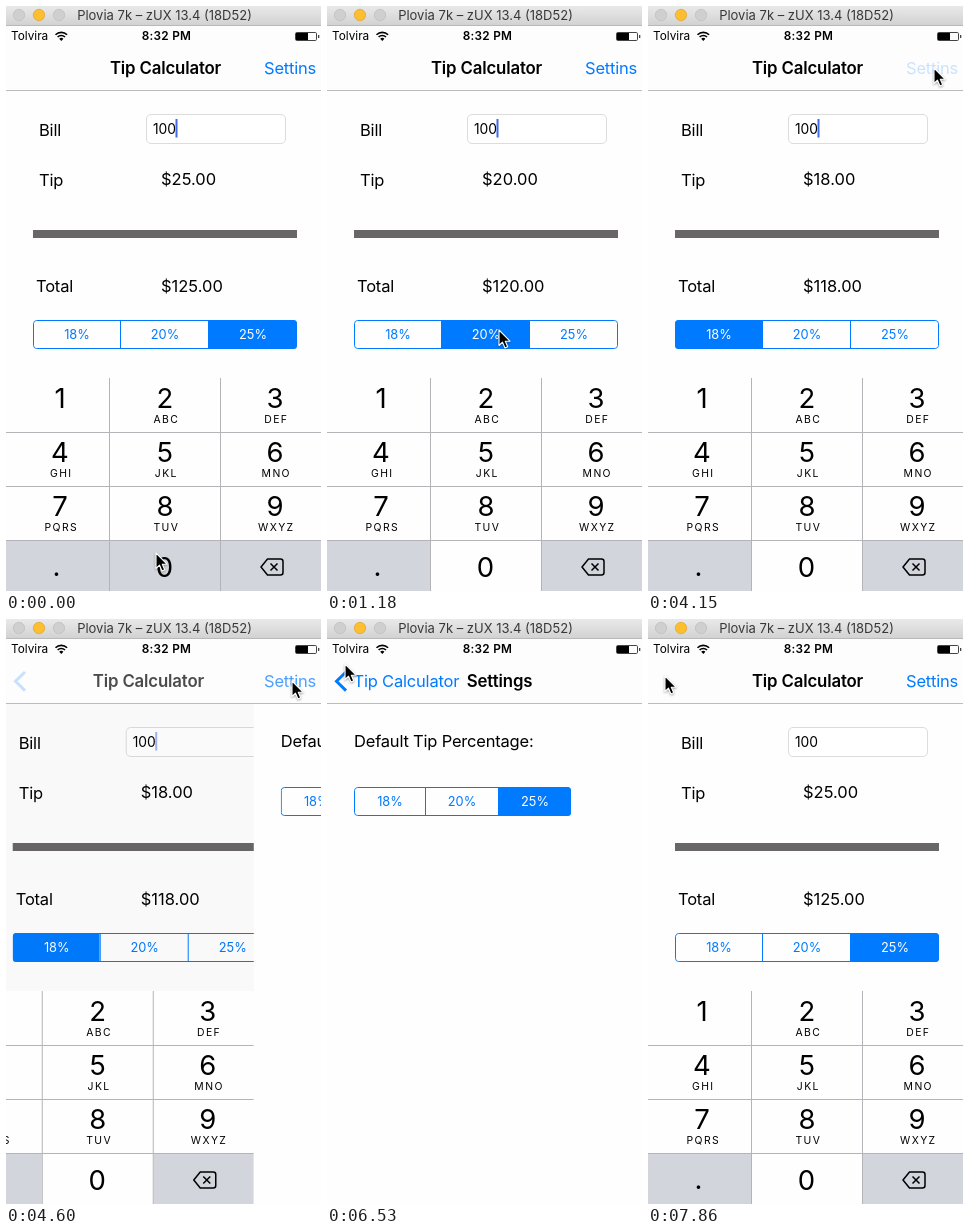
Recreate the animation shown at these times as an HTML page. Size 315 px wide and 585 px high, loop 8000 ms.

```html
<!DOCTYPE html>
<html lang="en">
<head>
<meta charset="utf-8">
<title>Tip Calculator</title>
<style>
  html, body { margin: 0; width: 100%; height: 100%; overflow: hidden; background: #fefefe; }
  svg { display: block; width: 100vw; height: 100vh; }
  text { font-family: Inter, Roboto, "Liberation Sans", sans-serif; font-size: 16.5px; letter-spacing: -.2px; fill: #000; white-space: pre; }
  .mid { text-anchor: middle; }
  .bold { font-weight: 600; font-size: 16.8px; letter-spacing: -.15px; }
  .value { letter-spacing: 0; }
  .small { font-size: 11.8px; letter-spacing: 0; }
  .clock { font-weight: 600; letter-spacing: .25px; }
  .window { font-size: 13px; letter-spacing: 0; fill: #383838; }
  .link { fill: #007aff; }
  .input { font-size: 13.8px; letter-spacing: 0; }
  .cell { font-size: 12.8px; letter-spacing: 0; }
  .digit { font-size: 27.5px; letter-spacing: 0; }
  .letters { font-size: 10.4px; letter-spacing: 1.4px; }
</style>
</head>
<body>
<svg id="stage" viewBox="0 0 315 585">
  <defs>
    <linearGradient id="chrome" x2="0" y2="1">
      <stop offset="0" stop-color="#e9e9e9"/><stop offset="1" stop-color="#d1d1d1"/>
    </linearGradient>
  </defs>
</svg>
<script>
const LOOP = 8000;
const BLUE = '#007aff', PAPER = '#fefefe', KEY_GRAY = '#d2d5db', LINE = '#b4b4b8';
const RATES = [18, 20, 25];
const stage = document.getElementById('stage');

function el(tag, attrs, parent = stage) {
  const node = document.createElementNS('http://www.w3.org/2000/svg', tag);
  for (const key in attrs) node.setAttribute(key, attrs[key]);
  return parent.appendChild(node);
}
const group = (parent) => el('g', {}, parent);
const rect = (x, y, width, height, fill, parent, more) =>
  el('rect', { x, y, width, height, fill, ...more }, parent);
const stroke = (d, color, width, parent, more) =>
  el('path', { d, fill: 'none', stroke: color, 'stroke-width': width, ...more }, parent);
function label(str, x, y, cls, parent) {
  const node = el('text', { x, y, class: cls }, parent);
  node.textContent = str;
  return node;
}
const shift = (node, x, y = 0) => node.setAttribute('transform', `translate(${x} ${y})`);
const fade = (node, v) => node.setAttribute('opacity', v);

// Segmented control; returns a function that selects one cell
function segments(edges, y, centers, parent) {
  const id = 'clip' + y, x = edges[0], w = edges[3] - x;
  rect(x, y, w, 29, '#000', el('clipPath', { id }), { rx: 3.5 });
  const fills = el('g', { 'clip-path': `url(#${id})` }, parent);
  const cells = RATES.map((rate, i) => ({
    box: rect(edges[i], y, edges[i + 1] - edges[i], 29, PAPER, fills),
    text: label(rate + '%', centers[i], y + 19, 'cell mid', parent)
  }));
  rect(x + .5, y + .5, w - 1, 28, 'none', fills, { rx: 3, stroke: BLUE });
  stroke(`M${edges[1] + .5} ${y}v29M${edges[2] + .5} ${y}v29`, BLUE, 1, fills);
  return (pick) => cells.forEach(({ box, text }, i) => {
    box.setAttribute('fill', i === pick ? BLUE : PAPER);
    text.style.fill = i === pick ? '#fff' : BLUE;
  });
}

// Calculator screen
const home = group();
rect(0, 85, 315, 500, PAPER, home);
label('Bill', 33, 130, '', home);
rect(140.5, 108.5, 139, 29, '#fff', home, { rx: 4.5, stroke: '#dcdcdc' });
label('100', 147, 128, 'input', home);
const caret = rect(169.5, 113, 2, 18.5, '#4169ef', home);
label('Tip', 33, 179.5, '', home);
const tipText = label('', 155, 178.5, 'value', home);
rect(27, 224, 264, 8, '#696667', home);
label('Total', 30, 286, '', home);
const totalText = label('', 155, 286, 'value', home);
const pickRate = segments([27, 114, 202, 291], 314, [71, 159, 247], home);
const shade = rect(0, 85, 315, 500, '#000', home);

// Keypad
const pad = group();
rect(0, 372, 315, 213, PAPER, pad);
rect(0, 535, 103, 50, KEY_GRAY, pad);
rect(215, 535, 100, 50, KEY_GRAY, pad);
const zeroKey = rect(104, 535, 110, 50, PAPER, pad);
stroke('M0 426.5h315M0 480.5h315M0 534.5h315M103.5 372v213M214.5 372v213', LINE, 1, pad);
const columns = [54, 159, 269];
['', 'ABC', 'DEF', 'GHI', 'JKL', 'MNO', 'PQRS', 'TUV', 'WXYZ'].forEach((letters, i) => {
  const x = columns[i % 3], y = 402 + 54 * Math.floor(i / 3);
  label(i + 1, x, y, 'digit mid', pad);
  label(letters, x + 1.3, y + 15, 'letters mid', pad);
});
label('0', 158.5, 571, 'digit mid', pad);
label('.', 50.5, 570, 'digit mid', pad);
stroke('M261.5 553h13a2.5 2.5 0 0 1 2.5 2.5v11a2.5 2.5 0 0 1-2.5 2.5h-13l-6.5-8z', '#000', 1.5, pad, { 'stroke-linejoin': 'round' });
stroke('M264.5 557.5l7 7m0-7l-7 7', '#000', 1.5, pad);

// Settings screen
const settings = group();
rect(0, 85, 315, 500, PAPER, settings);
label('Default Tip Percentage:', 27, 128, '', settings);
const pickDefault = segments([27, 98, 171, 244], 168, [63, 135, 208], settings);

// Navigation bar
rect(0, 20, 315, 65, '#fdfdfd');
stroke('M0 84.5h315', '#bcbcbd', 1);
const homeTitle = label('Tip Calculator', 159.5, 68, 'bold mid');
const action = label('Settins', 258, 68, 'link');
const chevron = stroke('M19 53l-9.5 9.3l9.5 9.3', BLUE, 3);
const backLabel = label('Tip Calculator', 26.5, 68, 'link');
const setTitle = label('Settings', 172.5, 68, 'bold mid');

// Status bar
label('Tolvira', 5, 34, 'small');
stroke('M49.5 28.7a8.3 8.3 0 0 1 11.6 0M51.6 31a5.3 5.3 0 0 1 7.4 0', '#000', 1.6);
el('path', { d: 'M55.3 35l-2.1-2.2a3 3 0 0 1 4.2 0z' });
label('8:32 PM', 160.5, 34, 'small clock mid');
rect(289.5, 26.5, 21, 8, 'none', stage, { rx: 1.2, stroke: '#444' });
rect(290, 27, 12, 7, '#000');
rect(312, 29, 1.3, 3, '#444');

// Window bar
rect(0, 0, 315, 20, 'url(#chrome)');
stroke('M0 19.5h315', '#b9b9b9', 1);
[['#cfcfcf', '#bdbdbd'], ['#fdbe2f', '#e0a32c'], ['#cfcfcf', '#bdbdbd']].forEach(([fill, edge], i) =>
  el('circle', { cx: 13 + 20 * i, cy: 9, r: 5.7, fill, stroke: edge, 'stroke-width': .7 }));
label('Plovia 7k – zUX 13.4 (18D52)', 158.5, 14, 'window mid');

const cursor = group();
cursor.style.filter = 'drop-shadow(0 1px 1px rgba(0,0,0,.35))';
el('path', {
  d: 'M0 0V15.5L3.5 12.2L6 18L8.7 16.8L6.3 11.2H11z',
  stroke: '#fff', 'stroke-width': 1.1, 'stroke-linejoin': 'round'
}, cursor);

// The picture updates in bursts: [first, last, count]
const ticks = [0];
[[150, 1180, 8], [1330, 2220, 7], [2520, 2660, 2], [3110, 4150, 8], [4600, 5630, 8],
 [5780, 5780, 1], [6080, 7120, 8], [7260, 7860, 5]].forEach(([a, b, n]) => {
  for (let i = 0; i < n; i++) ticks.push(a + (n > 1 ? (b - a) * i / (n - 1) : 0));
});

const path = [
  [0, 150, 547], [150, 150, 547], [1000, 172, 324], [1190, 172, 324], [1900, 65, 320],
  [3000, 65, 320], [3900, 286, 62], [4650, 286, 62], [5190, 221, 168], [5600, 213, 175],
  [5930, 213, 175], [6530, 18, 45], [6830, 17, 57], [LOOP, 17, 57]
];
const rateSteps = [[0, 2], [1030, 1], [1920, 0], [6960, 2]];

const clamp = (v) => Math.min(1, Math.max(0, v));
const smooth = (v) => v * v * (3 - 2 * v);
const easeOut = (v) => 1 - (1 - clamp(v)) ** 3;
const lastAt = (list, t, key) => list.filter((item) => key(item) <= t).pop();

function cursorAt(t) {
  const i = path.findIndex((p) => p[0] > t);
  const [t0, x0, y0] = path[i - 1], [t1, x1, y1] = path[i];
  const k = smooth((t - t0) / (t1 - t0));
  return [x0 + (x1 - x0) * k, y0 + (y1 - y0) * k];
}

function caretAt(t) {
  const phase = ((t - 3110) % 1020 + 1020) % 1020;
  if (phase < 400 || phase > 960) return 1;
  return phase < 500 ? .5 : 0;
}

function draw(t) {
  const push = easeOut((t - 4560) / 520) - easeOut((t - 6970) / 480);
  const rest = 1 - push;
  const pick = lastAt(rateSteps, t, (s) => s[0])[1];
  const tip = RATES[pick];

  pickRate(pick);
  tipText.textContent = '$' + tip.toFixed(2);
  totalText.textContent = '$' + (100 + tip).toFixed(2);
  pickDefault(t < 5780 ? 1 : 2);
  zeroKey.setAttribute('fill', t < 150 ? KEY_GRAY : PAPER);
  fade(caret, caretAt(t));

  shift(home, -95 * push);
  fade(shade, .1 * push);
  shift(pad, -315 * push);
  shift(settings, 315 * rest);

  shift(homeTitle, -80 * push);
  fade(homeTitle, clamp(1 - 1.4 * push));
  fade(action, t >= 4140 && t < 4600 ? .2 : clamp(1 - 1.4 * push));
  shift(backLabel, 80 * rest);
  fade(backLabel, clamp(1.4 * push - .4));
  fade(chevron, push);
  shift(setTitle, 150 * rest);
  fade(setTitle, clamp(1.4 * push - .4));

  shift(cursor, ...cursorAt(t));
}

const start = performance.now();
function loop() {
  const t = Math.max(0, performance.now() - start) % LOOP;
  draw(lastAt(ticks, t, (v) => v));
  requestAnimationFrame(loop);
}
loop();
</script>
</body>
</html>
```
